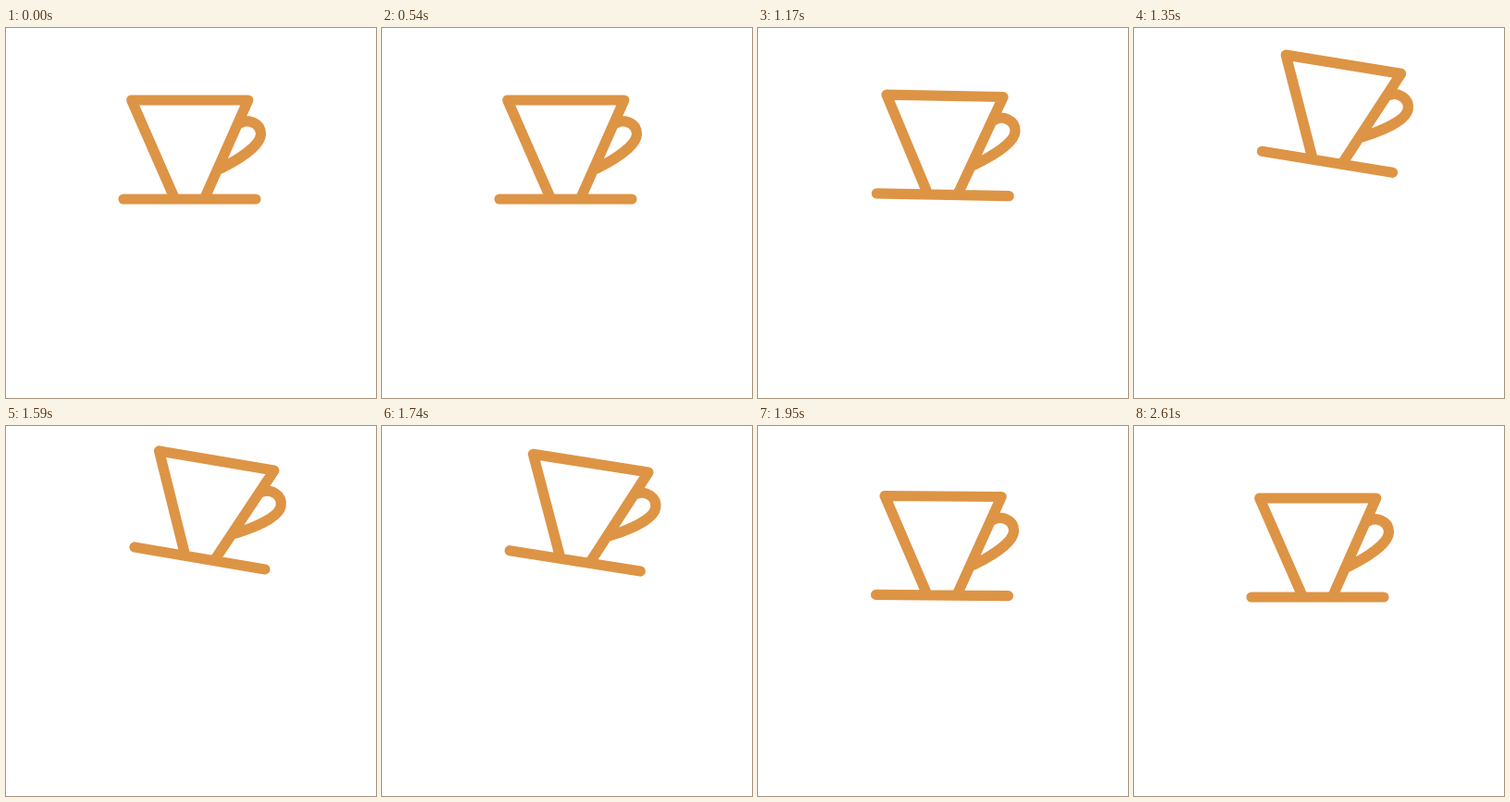
These frames come from a looping animation (400 px wide and 400 px high, 2760 ms). An HTML page with a canvas:

```html
<!DOCTYPE html>
<html lang="en">
<head>
<meta charset="utf-8">
<title>Lifted cup</title>
<style>
  html, body { margin: 0; width: 100%; height: 100%; overflow: hidden; background: #fff; }
  canvas { display: block; width: 400px; height: 400px; }
</style>
</head>
<body>
<canvas id="stage" width="400" height="400"></canvas>
<script>
const ctx = document.getElementById('stage').getContext('2d');
const LOOP = 2760, FRAME = 30;
const RISE = 930, PEAK = 1530, TRAVEL = 600;
const LIFT = { x: 11, y: -42.2, angle: 9.7 * Math.PI / 180 };
const BASE = { x: 198.5, y: 185 };

const cup = new Path2D(`
  M127 185 H270
  M182.6 185 L135.7 78 H261.8 L214.3 185
  M253 103 C261 98 275.5 102 275.5 115 C275 127 252 142 232 152`);

// Closed form of cubic-bezier(1, 0, 0, 1)
function ease(t) {
  const u = Math.cbrt((Math.min(1, Math.max(0, t)) - 0.5) / 4);
  return 0.5 + 1.5 * u - 2 * u ** 3;
}

function liftAt(ms) {
  return ms < PEAK ? ease((ms - RISE) / TRAVEL) : 1 - ease((ms - PEAK) / TRAVEL);
}

function draw(ms) {
  const p = liftAt(ms);
  ctx.fillStyle = '#fff';
  ctx.fillRect(0, 0, 400, 400);
  ctx.save();
  ctx.translate(BASE.x + LIFT.x * p, BASE.y + LIFT.y * p);
  ctx.rotate(LIFT.angle * p);
  ctx.translate(-BASE.x, -BASE.y);
  ctx.strokeStyle = '#dd9445';
  ctx.lineWidth = 11.2;
  ctx.lineCap = ctx.lineJoin = 'round';
  ctx.stroke(cup);
  ctx.restore();
}

const start = performance.now();
function tick() {
  const ms = (performance.now() - start) % LOOP;
  draw(Math.floor(ms / FRAME) * FRAME);
  requestAnimationFrame(tick);
}
tick();
</script>
</body>
</html>
```
